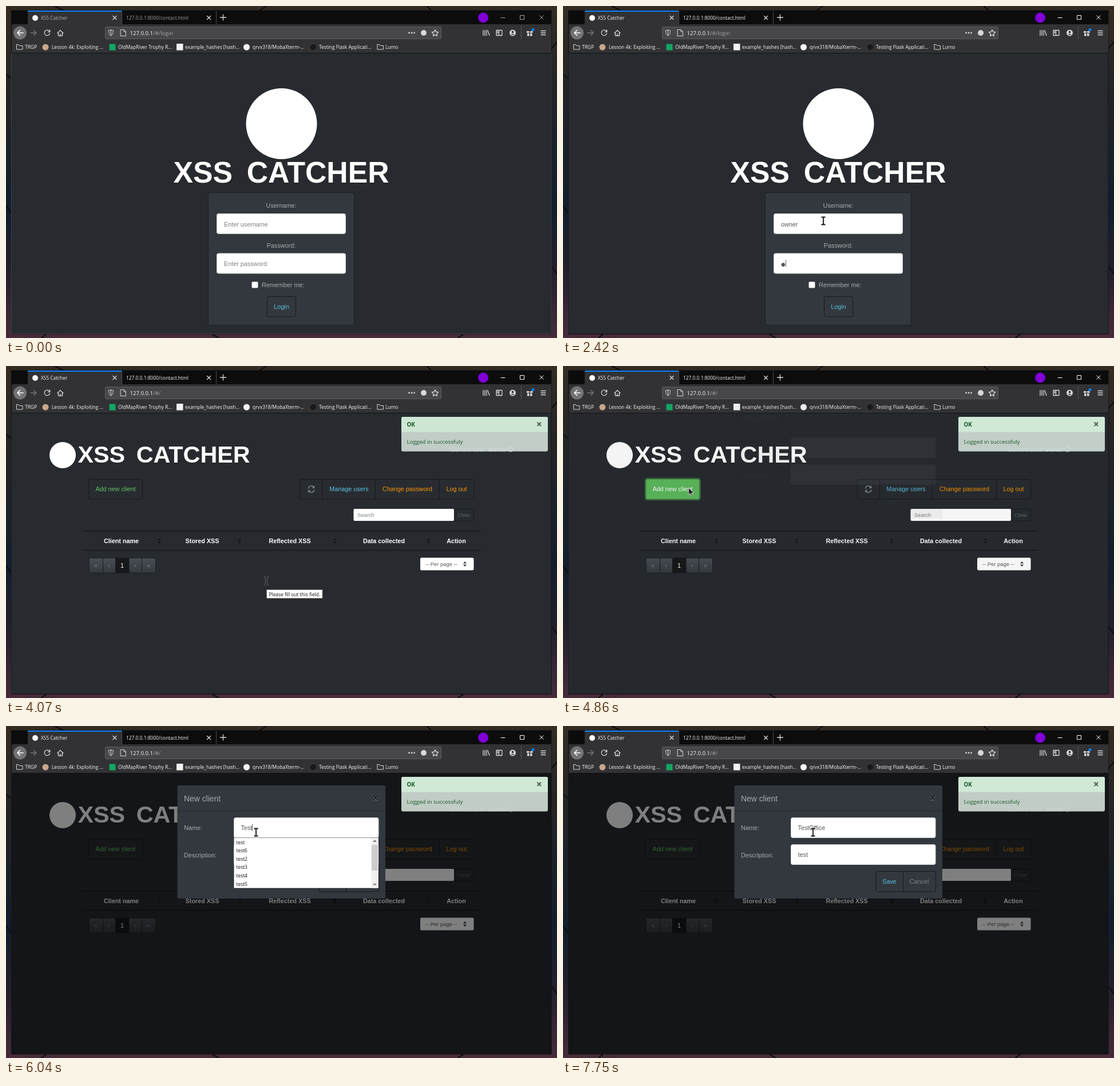
Animation of 963 by 581 pixels, one loop 8 s. Source, as an HTML page:

```html
<!DOCTYPE html>
<html lang="en">
<head>
<meta charset="utf-8">
<title>XSS Catcher</title>
<style>
html, body { margin: 0; width: 100%; height: 100%; overflow: hidden; background: #14171d; }
svg { display: block; width: 963px; height: 581px; font: 10.8px "Liberation Sans", Arial, sans-serif; }
text { white-space: pre; }
.ui { font-family: "Open Sans", "Noto Sans", sans-serif; font-size: 8.4px; fill: #f9f9fa; }
.url { font-size: 9.6px; }
.mid { text-anchor: middle; }
.bold { font-weight: bold; }
.label { fill: #aaa; }
.value { fill: #52575c; }
.hint { fill: #7a8288; }
.small { font-size: 9.4px; }
.mark { font-size: 51.7px; font-weight: bold; word-spacing: .2em; fill: #fff; text-anchor: middle; }
.input { fill: #fff; stroke: #d3d7db; }
.btn { fill: #32383e; stroke: #17191b; }
.flat { fill: #282c31; stroke: #17191b; }
.line { fill: none; stroke: #d7d7db; stroke-width: 1.3; stroke-linecap: round; stroke-linejoin: round; }
.info { fill: #5bc0de; }
.warn { fill: #f89406; }
.win { opacity: .62; }
.active .win { opacity: 1; }
.edge { fill: none; stroke: #3f4145; }
.active .edge { stroke: #1c1d20; }
#cursor { animation: move 8s infinite; }
#toast { animation: toast 8s linear infinite; }
#shade { animation: shade 8s linear infinite; }
#modal { animation: modal 8s ease-out infinite; }
@keyframes move {
  0%, .875% { transform: translate(788px, 543px); animation-timing-function: ease-out; }
  6.75%, 54.75% { transform: translate(455px, 376px); animation-timing-function: ease-in-out; }
  59.5%, 60.9% { transform: translate(219.5px, 213px); animation-timing-function: ease-in-out; }
  64.6%, 65.6% { transform: translate(413px, 143px); animation-timing-function: ease-in-out; }
  68.5%, 100% { transform: translate(437px, 186px); }
}
@keyframes toast {
  0%, 48.8% { opacity: 0; }
  50.9%, 100% { opacity: 1; }
}
@keyframes shade {
  0%, 60.74% { opacity: 0; }
  60.75%, 61.2% { opacity: .04; }
  63%, 100% { opacity: .5; }
}
@keyframes modal {
  0%, 60.74% { opacity: 0; transform: translateY(-35px); }
  60.75%, 61.2% { opacity: .04; transform: translateY(-35px); }
  64.5%, 100% { opacity: 1; transform: none; }
}
</style>
</head>
<body>
<svg id="stage" viewBox="0 0 963 581">
  <defs>
    <linearGradient id="wall" x2="0" y2="1">
      <stop offset="0" stop-color="#342c22"/><stop offset=".25" stop-color="#242425"/>
      <stop offset=".6" stop-color="#121e2d"/><stop offset=".8" stop-color="#251f2c"/>
      <stop offset="1" stop-color="#472b39"/>
    </linearGradient>
    <linearGradient id="cell" x2="0" y2="1">
      <stop offset="0" stop-color="#484e55"/><stop offset="1" stop-color="#353a3f"/>
    </linearGradient>
    <g id="folder" class="line"><path d="M.5 2.5v7.5h10.500v-6.500h-5.500l-1.500-2h-3.500z" style="stroke-width:1"/></g>
    <path id="sort" d="M-3-1l3-4 3 4zM-3 1l3 4 3-4z" fill="#16181b"/>
  </defs>

  <!-- desktop -->
  <rect width="963" height="581" fill="url(#wall)"/>
  <path d="M85 0l16 8M455 0l-12 8M735 0l9 8M0 120l9 6M0 350l9 12M953 75l10-12M953 455l10 14M70 574l-8 7M360 574l12 7M800 574l-10 7" stroke="#0c0d10" stroke-width="2"/>

  <!-- browser -->
  <rect x="9" y="7.500" width="944.500" height="567" fill="#0c0c0d"/>
  <rect x="38" y="8" width="164" height="25" fill="#323234"/>
  <rect x="38" y="8" width="164" height="2" fill="#0a84ff"/>
  <rect x="10" y="32" width="943" height="50" fill="#323234"/>
  <path d="M202.500 9v23M367.500 9v23" stroke="#4a4a4c"/>
  <circle cx="51" cy="21" r="5" fill="#fff"/>
  <g class="win">
    <text class="ui" x="61" y="24">XSS Catcher</text>
    <text class="ui" x="210" y="24">127.0.0.1:8000/contact.html</text>
    <path d="M864.500 20.500h8M898.500 16.500h7v7h-7zM932.500 16.500l7 7m0-7l-7 7" fill="none" stroke="#fff"/>
  </g>
  <path class="line" d="M187 17.500l6 6m0-6l-6 6M351.500 17.500l6 6m0-6l-6 6M374.500 20h10m-5-5v10"/>
  <circle cx="834" cy="20.500" r="9" fill="#8000d7"/>

  <circle cx="24.500" cy="47" r="11.500" fill="#737375"/>
  <path class="line" d="M30 47h-10m4.500-4.500l-4.500 4.500 4.500 4.500" style="stroke:#fff;stroke-width:1.600"/>
  <path class="line" d="M43 47h10m-4.500-4.500l4.500 4.500-4.500 4.500" style="stroke:#77777a"/>
  <path class="line" d="M76 44.500a4.700 4.700 0 1 0 .5 3.500M76.700 42v3.300h-3.300M90 47.500l5-5 5 5M91.500 47v5h7v-5M95 52v-3"/>
  <rect x="173.500" y="36.500" width="587" height="21" rx="1.500" fill="#474749" stroke="#5c5c5e"/>
  <path class="line" d="M179.500 43q4-.5 4-1.500 0 1 4 1.500 0 7-4 9-4-2-4-9zM183.500 42v9M200.500 41.500h5.500l3.500 3.500v7.500h-9zM206 41.500v3.500h3.500" style="stroke-width:1"/>
  <text class="ui url" x="216.500" y="50.500">127.0.0.1<tspan id="path" fill="#a6a6a9">/#/login</tspan></text>
  <g fill="#d7d7db">
    <circle cx="704.500" cy="47" r="1.400"/><circle cx="709" cy="47" r="1.400"/><circle cx="713.500" cy="47" r="1.400"/>
    <circle cx="730" cy="47" r="5"/>
  </g>
  <path class="line" d="M750 41.500l1.700 3.700 4 .5-3 2.700.8 4-3.500-2-3.500 2 .8-4-3-2.700 4-.5z"/>
  <path class="line" d="M834 42.500v9M837 42.500v9M840 42.500v9M842 43l3 8.500M857 42.500h10v9h-10zM861.500 42.500v9M858.500 45h1.500M858.500 47h1.500"/>
  <circle cx="885.500" cy="47" r="5.500" fill="#d7d7db"/>
  <circle cx="885.500" cy="45.500" r="1.900" fill="#323234"/><path d="M882 50.500q3.500-3.500 7 0z" fill="#323234"/>
  <path d="M900.500 35v23" stroke="#58585a"/>
  <path d="M910 44h4.500v3h-4.500zM916 44h4.500v3h-4.500zM911 48h3.500v4.500h-3.500zM916 48h3.500v4.500h-3.500z" fill="#d7d7db"/>
  <circle cx="921" cy="41.500" r="2.500" fill="#0a84ff"/>
  <path class="line" d="M935 43.500h8M935 47h8M935 50.500h8"/>

  <use href="#folder" x="18" y="66"/><use href="#folder" x="648.500" y="66"/>
  <circle cx="69" cy="72" r="5.500" fill="#c9a68a"/>
  <rect x="180.500" y="66.500" width="11" height="11" fill="#12a566"/>
  <rect x="298" y="66" width="11.500" height="11.500" fill="#f2f2f2"/>
  <circle cx="420.500" cy="72" r="5.500" fill="#f5f5f5"/>
  <circle cx="537" cy="72" r="5" fill="#17181a"/>
  <g class="ui">
    <text x="33" y="75">TRGP</text>
    <text x="80" y="75">Lesson 4k: Exploiting ...</text>
    <text x="196" y="75">OldMapRiver Trophy R...</text>
    <text x="313" y="75">example_hashes [hash...</text>
    <text x="431" y="75">qrvx318/MobaXterm-...</text>
    <text x="547" y="75">Testing Flask Applicati...</text>
    <text x="663" y="75">Lumo</text>
  </g>
  <rect x="9.500" y="82" width="943.500" height="492" fill="#272b30"/>
  <path d="M10 82.500h943" stroke="#111214"/>
  <path class="edge" d="M9.500 83v490.500h943.500v-490.500"/>

  <!-- login page -->
  <g id="login">
    <circle cx="481.500" cy="206" r="62" fill="#fff"/>
    <text class="mark" x="481" y="309">XSS CATCHER</text>
    <rect x="353.500" y="326.500" width="255" height="232" rx="3" fill="#32383e" stroke="#1b1d20"/>
    <text class="label mid" x="481" y="353">Username:</text>
    <text class="label mid" x="481" y="422.500">Password:</text>
    <rect class="input" x="368.500" y="363.500" width="225" height="35" rx="3"/>
    <rect class="input" x="368.500" y="433" width="225" height="35" rx="3"/>
    <rect x="429.500" y="482.500" width="11" height="11" rx="2" fill="#fff" stroke="#8b8f93"/>
    <text class="label" x="447" y="492">Remember me:</text>
    <rect class="btn" x="456.500" y="508.500" width="50" height="35" rx="3"/>
    <text class="info mid" x="481.500" y="530">Login</text>
    <g id="pass"></g>
    <g id="user"></g>
  </g>

  <!-- client list -->
  <g id="home">
    <circle cx="99" cy="156" r="23" fill="#fff"/>
    <text class="mark" x="276" y="169" style="font-size:41.300px">XSS CATCHER</text>
    <text class="label" x="777" y="149.500">Current user: <tspan class="bold">owner</tspan></text>
    <circle cx="881.500" cy="146" r="3.800" fill="none" stroke="#aaa" stroke-width="2" stroke-dasharray="2 1"/>
    <rect class="flat" x="144.500" y="198.500" width="94" height="34.500" rx="3"/>
    <text class="mid" x="191.500" y="219" fill="#62c462">Add new client</text>
    <g id="hover">
      <rect x="144" y="197" width="95.500" height="37" rx="4" fill="#5cb85c" stroke="#3b6e3f" stroke-width="2.500"/>
      <text class="mid" x="191.500" y="219" fill="#fff">Add new client</text>
    </g>
    <rect class="flat" x="514.500" y="198.500" width="303" height="34.500" rx="3"/>
    <path d="M553.500 198v35M645.500 198v35M757.500 198v35" stroke="#17191b"/>
    <path class="line" style="stroke:#8d9499" d="M528.500 214a5.300 5.300 0 0 1 10-1m0-2.500v2.700h-2.700M538.800 217a5.300 5.300 0 0 1-10 1m0 2.500v-2.700h2.700"/>
    <g class="mid">
      <text class="info" x="599.500" y="219">Manage users</text>
      <text class="warn" x="701.500" y="219">Change password</text>
      <text class="warn" x="787.500" y="219">Log out</text>
    </g>
    <rect x="607.500" y="250" width="175.500" height="21" rx="2" fill="#fff"/>
    <text class="hint small" x="614" y="264">Search</text>
    <rect class="flat" x="783.500" y="250.500" width="33.500" height="20.500" rx="2"/>
    <text class="small mid" x="800" y="264" fill="#5b6167">Clear</text>
    <path d="M134 289h695M134 322.500h695" stroke="#17191b" stroke-width="1.500"/>
    <g class="bold mid" fill="#fff">
      <text x="201.500" y="310">Client name</text><text x="343" y="310">Stored XSS</text>
      <text x="496" y="310">Reflected XSS</text><text x="660.500" y="310">Data collected</text>
      <text x="787" y="310">Action</text>
    </g>
    <use href="#sort" x="268" y="306"/><use href="#sort" x="408.500" y="306"/>
    <use href="#sort" x="574.500" y="306"/><use href="#sort" x="738.500" y="306"/>
    <rect x="145" y="336" width="116.500" height="26" rx="3" fill="url(#cell)" stroke="#1b1d20"/>
    <rect x="191" y="336" width="24.500" height="26" fill="#16181b"/>
    <path d="M169.500 336v26M237.500 336v26" stroke="#1b1d20"/>
    <g class="mid hint">
      <text x="157" y="352.500">«</text><text x="180" y="352.500">‹</text>
      <text x="203" y="352.500" fill="#fff">1</text>
      <text x="226" y="352.500">›</text><text x="249" y="352.500">»</text>
    </g>
    <rect x="724" y="335.500" width="93.500" height="22" rx="2.500" fill="#fff"/>
    <text class="value small" x="733" y="350">-- Per page --</text>
    <path d="M799 345.500l3-3.500 3 3.500zM799 347.500l3 3.500 3-3.500z" fill="#343a40"/>
    <rect id="shade" x="9.500" y="83" width="943.500" height="491" fill="#000"/>

    <g id="modal">
      <rect x="299.500" y="104" width="363.500" height="198" rx="3" fill="#32383e"/>
      <path d="M300 148.500h363" stroke="#25292d"/>
      <text class="label" x="311" y="131.500" style="font-size:13.900px">New client</text>
      <path d="M642.500 123l7 7m0-7l-7 7" stroke="#8d9297" stroke-width="2.600"/>
      <path d="M642.500 122.500l7 7m0-7l-7 7" stroke="#15171a" stroke-width="1.800"/>
      <text class="label" x="311" y="182">Name:</text>
      <text class="label" x="311" y="229.500">Description:</text>
      <rect class="input" x="398.500" y="160.500" width="252.500" height="35" rx="3"/>
      <rect class="input" x="398.500" y="207.500" width="252.500" height="35" rx="3"/>
      <rect class="btn" x="547" y="254.500" width="104.500" height="35.500" rx="3"/>
      <path d="M594.500 254.500v35.500" stroke="#17191b"/>
      <text class="info mid" x="570.500" y="276">Save</text>
      <text class="hint mid" x="622.500" y="276">Cancel</text>
      <g id="name"></g>
      <g id="desc"></g>
    </g>

    <g id="toast">
      <rect x="691" y="89" width="256" height="60.500" rx="3" fill="#d4e2d9" opacity=".9"/>
      <path d="M691 115.500v-23.500q0-3 3-3h250q3 0 3 3v23.500z" fill="#d0e9d6"/>
      <g class="ui" style="font-size:9.750px">
        <text class="bold" x="700.500" y="106" fill="#155724">OK</text>
        <text x="700.500" y="136" fill="#155724">Logged in successfuly</text>
      </g>
      <path d="M928.500 98.500l6.500 6.500m0-6.500l-6.500 6.500" stroke="#4c5b50" stroke-width="1.800"/>
    </g>
  </g>

  <g id="tip">
    <rect x="455.500" y="391.500" width="97.500" height="15" fill="#fff" stroke="#767676"/>
    <text class="ui" x="459.500" y="402.500" style="fill:#111">Please fill out this field.</text>
  </g>
  <g id="cursor">
    <path id="arrow" d="M0 0v12.500l2.900-2.700 2 4.500 1.900-.8-2-4.400h4z" fill="#111" stroke="#ddd" stroke-width=".9"/>
    <g id="beam" fill="none">
      <path d="M-3.500-6.500h7M0-6.500v13M-3.500 6.500h7" stroke="#fff" stroke-width="3" opacity=".6"/>
      <path d="M-3.500-6.500h7M0-6.500v13M-3.500 6.500h7" stroke="#111" stroke-width="1.800"/>
    </g>
  </g>
</svg>
<script>
const LOOP = 8000, ROW = 14.6, MAX_ROWS = 6, BLINK = 470;
const $ = id => document.getElementById(id);
const within = (t, [from, to]) => t >= from && t < to;

// visibility keeps the CSS animations inside running
const shown = [
  ['login', [0, 3910]], ['home', [3910, LOOP]], ['hover', [4690, 4940]], ['tip', [3760, 4380]],
  ['arrow', [70, 500], [4380, 5400]], ['beam', [500, 4380], [5400, LOOP]]
];

const tests = ['test', ...[6, 2, 3, 4, 5, 1, 7, 8].map(n => 'test' + n)];
const fields = [
  { id: 'user', x: 369, y: 364, w: 224.5, hint: 'Enter username', text: 'owner',
    keys: [1480, 1560, 1640, 1710, 1790], focus: [700, 1950],
    menu: [1400, 2180], list: ['owner', 'leo', 'jkl', 'test', 'lin'] },
  { id: 'pass', x: 369, y: 433, w: 224.5, hint: 'Enter password', text: '●'.repeat(8),
    keys: [2420, 2580, 2660, 2740, 2890, 2970, 3210, 3280], focus: [2180, 3760] },
  { id: 'name', x: 398.5, y: 160, w: 252.5, hint: '', text: 'TestOffice',
    keys: [5720, 5800, 5960, 6040, 6500, 6580, 6660, 6820, 6900, 7050], focus: [5570, 7200],
    menu: [5720, 7200], list: tests },
  { id: 'desc', x: 398.5, y: 207.5, w: 252.5, hint: '', text: 'test',
    keys: [7280, 7360, 7520, 7600], focus: [7200, 7670],
    menu: [7280, 7750], list: ['test', 'test2', 'testing', 'test page'] }
];

function menuMarkup({ x, y, w, list }, typed) {
  const items = list.filter(s => s.includes(typed.toLowerCase()));
  if (!items.length) return '';
  const rows = items.slice(0, MAX_ROWS), top = y + 35, h = rows.length * ROW + 1;
  let out = `<rect x="${x + 1}" y="${top + 1}" width="${w}" height="${h}" fill="#000" opacity=".45"/>
    <rect x="${x}" y="${top}" width="${w}" height="${h}" fill="#fff"/>
    <path d="M${x} ${top + .5}h${w}" stroke="#8d9094"/>`;
  rows.forEach((s, i) => {
    out += `<text class="ui" x="${x + 4}" y="${top + 11.5 + i * ROW}" style="fill:#111">${s}</text>`;
  });
  if (items.length > MAX_ROWS) {
    const sx = x + w - 12.5, end = top + h;
    out += `<rect x="${sx}" y="${top + 1}" width="12" height="${h - 1}" fill="#f0f0f0"/>
      <rect x="${sx + .5}" y="${top + 13}" width="11" height="45" fill="#cdcdcd"/>
      <path d="M${sx + 3.5} ${top + 8}l2.500-2.500 2.500 2.500M${sx + 3.5} ${end - 8}l2.500 2.500 2.500-2.500" fill="none" stroke="#505050" stroke-width="1.300"/>`;
  }
  return out;
}

function drawField(f, t) {
  const hits = f.keys.filter(k => k <= t);
  const typed = f.text.slice(0, hits.length);
  const last = hits.at(-1) ?? f.focus[0];
  const caret = within(t, f.focus) && (t - last) % (2 * BLINK) < BLINK;
  const open = f.menu && within(t, f.menu);
  const key = typed + caret + open;
  if (f.key === key) return;
  f.key = key;
  const x = f.x + 12, y = f.y + 21.5;
  const dots = f.id === 'pass' && typed ? 'style="font:8.700px \'DejaVu Sans\',sans-serif"' : '';
  const g = $(f.id);
  g.innerHTML = `<text class="${typed ? 'value' : 'hint'}" x="${x}" y="${y}" ${dots}>${typed || f.hint}</text>`
    + (open ? menuMarkup(f, typed) : '');
  if (caret) {
    const cx = x + (typed ? g.firstChild.getComputedTextLength() : 0);
    g.innerHTML += `<rect x="${Math.round(cx)}" y="${f.y + 11.5}" width=".8" height="12" fill="#333"/>`;
  }
}

let start;
function frame(now) {
  start ??= now;
  const t = (now - start) % LOOP;
  for (const [id, ...spans] of shown)
    $(id).style.visibility = spans.some(s => within(t, s)) ? '' : 'hidden';
  $('stage').classList.toggle('active', t >= 700);
  $('path').textContent = t < 3840 ? '/#/login' : '/#/';
  for (const f of fields) drawField(f, t);
  requestAnimationFrame(frame);
}
requestAnimationFrame(frame);
</script>
</body>
</html>
```
